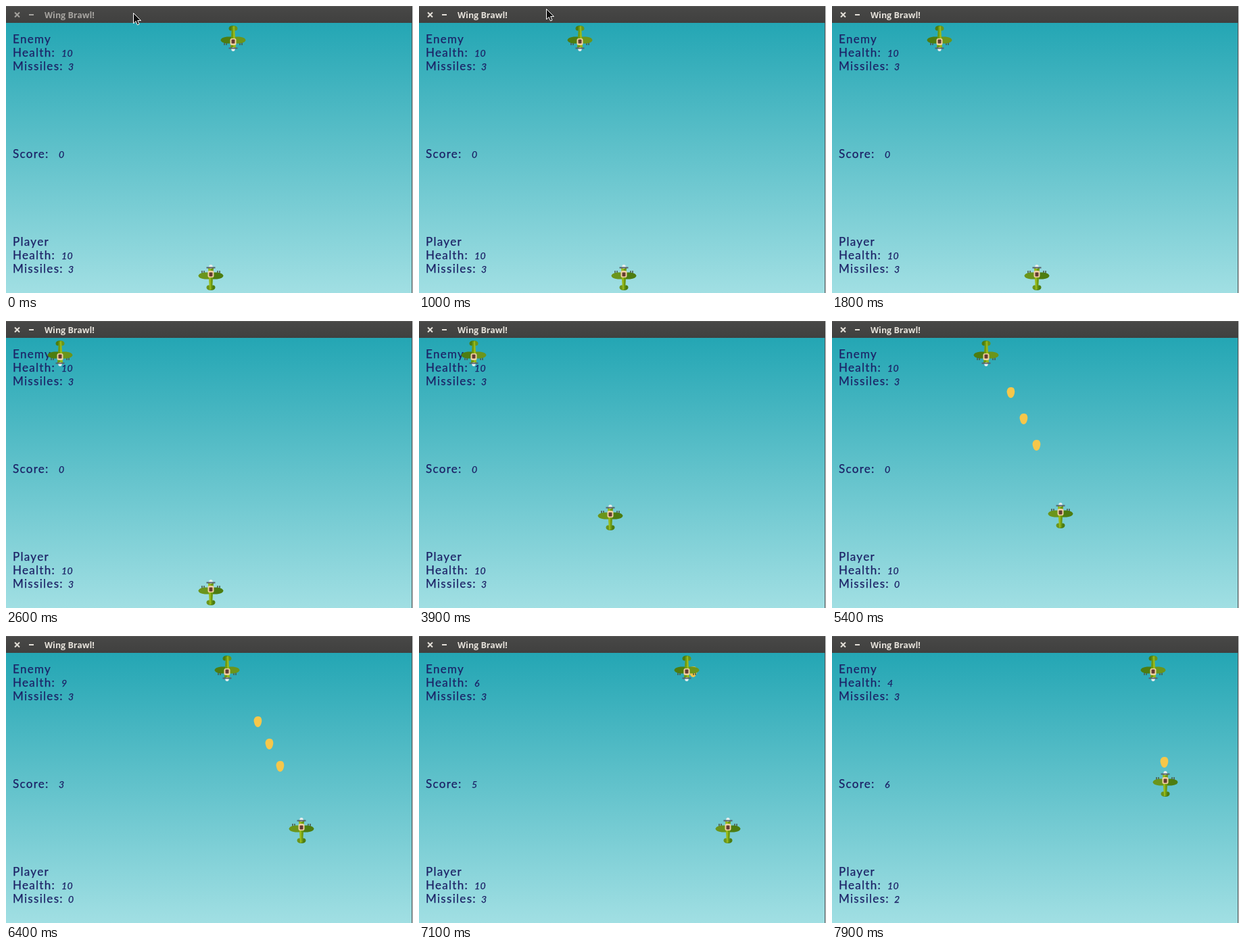
An HTML page that plays this animation: 602 px wide and 425 px high, repeating every 8000 ms.

```html
<!DOCTYPE html>
<html lang="en">
<head>
<meta charset="utf-8">
<title>Wing Brawl!</title>
<style>
  html, body { margin: 0; width: 100%; height: 100%; overflow: hidden; }
  svg { display: block; }
  #hud { fill: #1c2166; stroke: #1c2166; stroke-width: .25; }
  .label { font: 17px Lato, sans-serif; letter-spacing: 1.3px; }
  .value { font: italic 14px Lato, sans-serif; letter-spacing: .5px; }
  #bar { fill: #a5a39f; stroke: #a5a39f; }
  #bar.focused { fill: #e4e0d9; stroke: #e4e0d9; }
  #bar text { font: bold 12.5px "Open Sans", sans-serif; stroke: none; }
</style>
</head>
<body>
<svg width="602" height="425" viewBox="0 0 602 425">
  <defs>
    <linearGradient id="sky" x2="0" y2="1">
      <stop stop-color="#24a6b4"/><stop offset="1" stop-color="#a1dfe3"/>
    </linearGradient>
    <linearGradient id="chrome" x2="0" y2="1">
      <stop stop-color="#484847"/><stop offset="1" stop-color="#40403f"/>
    </linearGradient>
    <path id="wing" d="M0-7.500H9Q18-6.500 18.500-2.500Q18 1.500 9 2.500H0Z"/>
    <path id="tail" d="M0 11.500H4Q6.500 12 6.500 15Q6 19 0 19Z"/>
    <g id="plane">
      <path d="M-13-10V-6M-10-10V-6M10-10V-6M13-10V-6" stroke="#4b5a4c" stroke-width="1.6"/>
      <g fill="#6b951b" transform="scale(-1 1)"><use href="#wing"/><use href="#tail"/></g>
      <g fill="#4d7d10"><use href="#wing"/><use href="#tail"/></g>
      <path d="M-4-14H0V18H-2Z" fill="#97b91a"/>
      <path d="M4-14H0V18H2Z" fill="#6d9a12"/>
      <ellipse cy="-16" rx="2.700" ry="3" fill="#e8eeee"/>
      <path d="M-6.500-14.500H6.500" stroke="#56616a" stroke-width="2"/>
      <rect x="-4.500" y="-10" width="9" height="10" rx="2.500" fill="#f0d3a0"/>
      <rect x="-2.500" y="-7.500" width="5" height="6" rx="1" fill="#653a32"/>
    </g>
    <path id="missile" d="M-3-7Q.5-9 4.500-7Q7-4 6 1Q4.500 8 .5 8Q-3.500 8-5 1Q-6.500-4-3-7Z" fill="#f6c74a"/>
  </defs>

  <rect y="25" width="602" height="400" fill="url(#sky)"/>
  <g id="hud"></g>
  <g id="missiles"></g>
  <use id="enemy" href="#plane"/>
  <use id="player" href="#plane"/>

  <rect width="602" height="25" fill="url(#chrome)"/>
  <path d="M0 .5H602" stroke="#5b5a58"/>
  <path d="M600.500 25V425" stroke="#4a5456"/>
  <path d="M601.500 0V425" stroke="#d8dada"/>
  <g id="bar">
    <path d="M13 9.500L20 16.500M20 9.500L13 16.500M34 13H41" stroke-width="2"/>
    <text x="57" y="18">Wing Brawl!</text>
  </g>
  <path id="cursor" d="M.5 .5V16L4 12.500L6.500 18L9 17L6.700 11.500H11.500Z" fill="#111" stroke="#fff"/>
</svg>
<script>
const $ = id => document.getElementById(id);
const LOOP = 8000, STEP = 100;
const PLANE_SPEED = 0.0985, MISSILE_SPEED = 0.2; // px per ms
const MUZZLE = 30, HIT_Y = 52, RELOAD = 500, MAGAZINE = 3;

// Distance covered by time t when moving only between two moments
const moved = (t, from, to = LOOP) =>
  PLANE_SPEED * Math.max(0, Math.min(t, to) - from);

// The enemy flies to the left edge, waits briefly and turns back
const enemyX = t => Math.max(24, 336 - moved(t, 0)) + moved(t, 3325);

// The player steers with held keys: left, right, right; up, up
const playerX = t => 303 - moved(t, 3700, 4370) + moved(t, 4370, 6600) + moved(t, 7530);
const playerY = t => 402 - moved(t, 2770, 3930) - moved(t, 7200);

const cursorY = t => 10 - 0.02 * Math.max(0, t - 700) - 0.1 * Math.max(0, t - 1000);

const volleys = [
  { start: 4640, gap: 195, count: 3 },
  { start: 5745, gap: 165, count: 3 },
  { start: 7880, gap: 165, count: 1 },
];
const launch = (volley, i) => {
  const time = volley.start + i * volley.gap;
  const y = playerY(time) - MUZZLE;
  return { time, x: playerX(time), y, hit: time + (y - HIT_Y) / MISSILE_SPEED };
};
const shots = volleys.flatMap(v => Array.from({ length: v.count }, (_, i) => launch(v, i)));

function ammoAt(t) {
  const fired = shots.filter(s => s.time <= t);
  const used = fired.length % MAGAZINE;
  const empty = fired.length && !used && t < fired.at(-1).time + RELOAD;
  return empty ? 0 : MAGAZINE - used;
}

function addText(cls, x, y, text) {
  const el = document.createElementNS("http://www.w3.org/2000/svg", "text");
  el.setAttribute("class", cls);
  el.setAttribute("x", x);
  el.setAttribute("y", y);
  el.textContent = text;
  return $("hud").appendChild(el);
}

function addRow(y, label, x, value) {
  addText("label", 10, y, label);
  return addText("value", x, y, value);
}

function addStats(y, name) {
  addText("label", 10, y, name);
  return {
    health: addRow(y + 20, "Health:", 82, 10),
    ammo: addRow(y + 40, "Missiles:", 92, MAGAZINE),
  };
}

const enemy = addStats(55, "Enemy");
const score = addRow(225, "Score:", 78, 0);
const player = addStats(355, "Player");

const place = (id, x, y, turn = 0) =>
  $(id).setAttribute("transform", `translate(${Math.round(x)} ${Math.round(y)}) rotate(${turn})`);

function draw(t) {
  place("enemy", enemyX(t), 48, 180);
  place("player", playerX(t), playerY(t));
  place("cursor", 188, cursorY(t));
  $("bar").classList.toggle("focused", t >= 300);

  $("missiles").innerHTML = shots
    .filter(s => t >= s.time && t < s.hit)
    .map(s => {
      const y = s.y - (t - s.time) * MISSILE_SPEED;
      return `<use href="#missile" x="${Math.round(s.x)}" y="${Math.round(y)}"/>`;
    })
    .join("");

  const hits = shots.filter(s => t >= s.hit).length;
  score.textContent = hits;
  enemy.health.textContent = 10 - Math.floor(hits * hits / 6);
  player.ammo.textContent = ammoAt(t);
}

const start = performance.now();
function tick() {
  const t = Math.max(0, performance.now() - start) % LOOP;
  draw(Math.floor(t / STEP) * STEP);
  requestAnimationFrame(tick);
}
tick();
</script>
</body>
</html>
```
